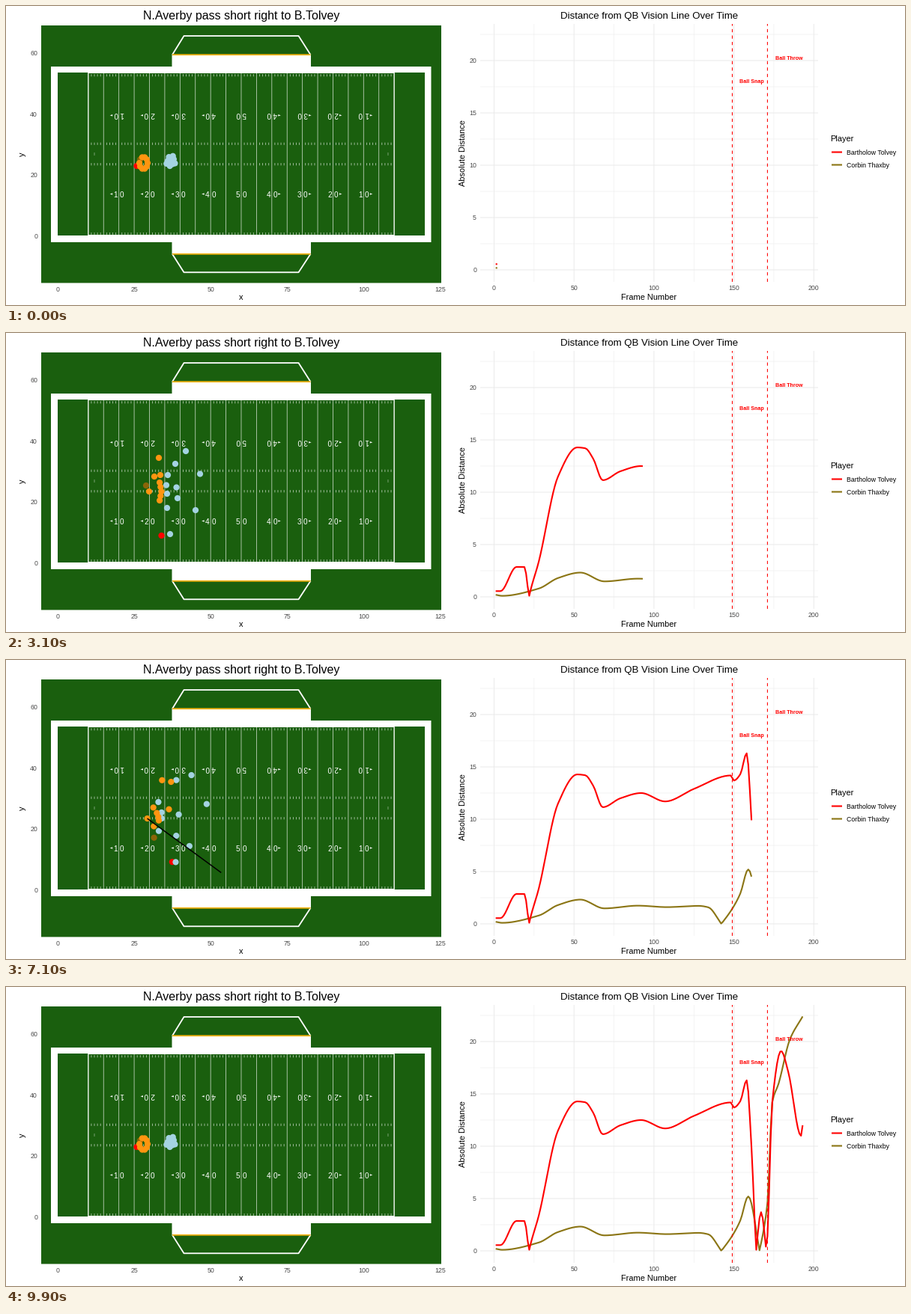
A matplotlib script for the animation above (10000 ms loop, 1200x400 px).

```python
import numpy as np
import matplotlib.pyplot as plt
from matplotlib.animation import FuncAnimation
from matplotlib.patches import Polygon, Rectangle

W, H, DPI = 1200, 400, 100
PX = 72 / DPI
GRASS, ORANGE, BLUE = "#1a5f0e", "#ff9510", "#a4d3e2"
RED, OLIVE, BROWN = "#ff0000", "#8b7514", "#8b6508"
GRID, TICK = "#ebebeb", "#4d4d4d"
SNAP, THROW, LAST = 149, 171, 193

plt.rcParams["font.family"] = "Liberation Sans"
fig = plt.figure(figsize=(W / DPI, H / DPI), dpi=DPI, facecolor="white")
ax = fig.add_axes([0, 0, 1, 1])
ax.set(xlim=(0, W), ylim=(H, 0))
ax.axis("off")


# ---- drawing helpers, all in pixels ----

def label(x, y, s, size, color="black", ha="center", rot=0, weight="normal"):
    """Text whose capitals are centred on y, for rot 0, 90 or 180."""
    off = 0.36 * size
    dx, dy = {0: (0, off), 90: (off, 0), 180: (0, -off)}[rot]
    ax.text(x + dx, y + dy, s, fontsize=size * PX, color=color, ha=ha,
            va="baseline", rotation=rot, rotation_mode="anchor", weight=weight)


def box(x0, y0, x1, y1, color):
    ax.add_patch(Rectangle((x0, y0), x1 - x0, y1 - y0, fc=color, ec="none", snap=False))


def line(xs, ys, color, width, **kw):
    return ax.plot(xs, ys, color=color, lw=width * PX, solid_capstyle="butt",
                   snap=False, **kw)[0]


def uprights(xs, y0, y1, width, alpha=1):
    ax.vlines(xs, y0, y1, color="white", lw=width * PX, alpha=alpha, snap=False)


def fx(x):
    return 69 + 4.083 * np.asarray(x)


def gx(n):
    return 651.5 + 2.134 * np.asarray(n)


def gy(v):
    return 353 - 14 * np.asarray(v)


# ---- still parts ----

def draw_field():
    box(47, 26, 581, 370.5, GRASS)
    box(60, 81, 567.5, 316, "white")
    box(69, 89, 559, 307, GRASS)

    for edge, bench, back in ((81, 65.2, 40), (316, 331.8, 356.3)):
        box(221.5, min(edge, bench), 407, max(edge, bench), "white")
        line([222, 237.5, 390.5, 406.5], [bench, back, back, bench], "white", 1.8)
        line([222, 406.5], [bench, bench], "#f2b212", 1.8)

    yards = np.arange(10, 111)
    on_five = yards % 5 == 0
    uprights(fx(yards[on_five]), 89.5, 306.5, 0.8, 0.75)
    uprights(fx([10, 110]), 89, 307, 1.1)
    for y in (89.5, 306.5):
        line(fx([10, 110]), [y, y], "white", 1)
    for y in (92.7, 184.3, 211.7, 304.6):
        uprights(fx(yards[~on_five]), y - 1.6, y + 1.6, 0.8, 0.7)
    uprights(fx([12, 108]), 196, 200, 0.8, 0.5)

    for k in range(1, 10):
        x, way = fx(10 + 10 * k), np.sign(k - 5)
        for y, rot, side in ((252.5, 0, -1), (145.3, 180, 1)):
            label(x + 4.2 * side, y, str(min(k, 10 - k)), 10, "white", rot=rot)
            label(x - 4.2 * side, y, "0", 10, "white", rot=rot)
            tip, base, mid = x + 12 * way, x + 8.5 * way, y + side
            if way:
                ax.add_patch(Polygon([(tip, mid), (base, mid - 1.2), (base, mid + 1.2)],
                                     fc="white", ec="none"))

    for v in range(0, 126, 25):
        label(fx(v), 379, str(v), 8.8, TICK)
    for v in range(0, 61, 20):
        label(42, 307.5 - 4.075 * v, str(v), 8.8, TICK, ha="right")
    label(314, 389.5, "x", 11)
    label(21.5, 198.5, "y", 11, rot=90)
    label(313.8, 12, "N.Averby pass short right to B.Tolvey", 16)


def draw_chart():
    for i in range(9):
        line([gx(25 * i)] * 2, [24, 369], GRID, 0.5 if i % 2 else 1.07)
        line([633, 1084], [gy(2.5 * i)] * 2, GRID, 0.5 if i % 2 else 1.07)
    line([633, 1084], [gy(22.5)] * 2, GRID, 0.5)
    for i in range(5):
        label(gx(50 * i), 377, str(50 * i), 8.8, TICK)
        label(628, gy(5 * i) + 0.3, str(5 * i), 8.8, TICK, ha="right")
    label(858.5, 389.5, "Frame Number", 11)
    label(609.5, 197, "Absolute Distance", 11, rot=90)
    label(858.5, 12, "Distance from QB Vision Line Over Time", 13.2)

    label(1100, 177.5, "Player", 11, ha="left")
    for y, color, name in ((195.5, RED, "Bartholow Tolvey"), (212.5, OLIVE, "Corbin Thaxby")):
        line([1102, 1116], [y, y], color, 2.1)
        label(1122.5, y + 0.5, name, 8.8, ha="left")


# ---- motion ----

def smooth(points, n):
    """Monotone cubic curve through a few (time, value) points."""
    t, v = np.array(points, float).T
    d = np.diff(v) / np.diff(t)
    a, b = d[:-1], d[1:]
    same = a * b > 0
    inner = np.where(same, 2 * a * b / np.where(same, a + b, 1), 0)
    m = np.concatenate([d[:1], inner, d[-1:]])
    i = np.clip(np.searchsorted(t, n, side="right") - 1, 0, len(t) - 2)
    h = t[i + 1] - t[i]
    u = np.clip((n - t[i]) / h, 0, 1)
    return ((1 - u) ** 2 * ((1 + 2 * u) * v[i] + u * h * m[i])
            + u ** 2 * ((3 - 2 * u) * v[i + 1] - (1 - u) * h * m[i + 1]))


def ease(n, start, end, power=None):
    u = np.clip((n - start) / (end - start), 0, 1)
    return u ** power if power else u * u * (3 - 2 * u)


# Signed distances; the chart shows their size, so a sign change is a sharp dip.
WIDE = [(1, -.55), (4, -.55), (14, -2.86), (19, -2.85), (22, .1), (28, 3.4), (40, 11.5),
        (52, 14.28), (57, 14.2), (62, 13.2), (68, 11.15), (79, 12), (92, 12.5), (107, 11.7),
        (125, 12.9), (148, 14.18), (150, 13.7), (154, 14.3), (158, 16.3), (161, 9.9), (164, .1),
        (167, -3.7), (170, -.4), (171, 1.4), (174, 14.2), (179.5, 19.1), (184, 17.1),
        (192, 11), (193, 12)]
BACK = [(1, .2), (5, .1), (28, .8), (40, 1.8), (54, 2.32), (69, 1.48), (90, 1.74), (108, 1.6),
        (128, 1.72), (134, 1.58), (142, .03), (149, -1.45), (154, -2.9), (159, -5.2),
        (166, -.05), (171, 4.6), (174, 14.2), (178, 16), (185, 20.2), (193, 22.4)]
AIM = [(149, 37.7), (157, 27), (161, -36.3), (165.5, -65), (171, -42.8)]

# Each player: spot at the snap, spot at the throw.
LINE_SET = [(207.5 - 1.2 * abs(k), 212 + 6 * k) for k in range(2, -3, -1)]
LINE_END = [(187.5, 220.5), (201, 210.5), (198, 207), (195, 203), (186, 194)]
OFFENSE = [((207.5, 271), (240, 269)), ((189, 220.5), (208.5, 259.5)),
           *zip(LINE_SET, LINE_END),
           ((191, 212), (185.5, 212)), ((204, 167), (241, 158)),
           ((203, 178), (215, 139)), ((206, 190), (232, 212))]
DEFENSE = [((240, 158), (257, 149)), ((226, 175), (229, 142.5)), ((216, 190), (187.5, 190)),
           ((259, 188.5), (279, 198)), ((214, 203.5), (199.5, 204.5)),
           ((227.5, 206.5), (234.5, 207)), ((215, 215), (199, 208)), ((229, 221), (225, 253)),
           ((215, 234), (190, 222)), ((253, 237), (234.5, 264)), ((219, 269), (236, 272))]
RUNNER, QB, SLOT = 1, 7, 9
CATCH = np.array([275, 270])

spots = np.array(OFFENSE + DEFENSE, float)
at_snap, at_throw = spots[:, 0], spots[:, 1]
lined_up = at_snap.copy()
lined_up[[RUNNER, SLOT]] = (187, 204), (198, 192)  # both shift before the snap

# The offense huddles in a ring, the defense in a loose bunch.
k = np.arange(11)
ring, spiral = k * 2 * np.pi / 10, k * 2.4
bunch = np.sqrt(k / 10)
huddle = np.concatenate([
    np.c_[183.5 - 5.5 * np.cos(ring), 210 - 8 * np.sin(ring)],
    np.c_[220 + 6.5 * bunch * np.cos(spiral), 208 + 8 * bunch * np.sin(spiral)]])
huddle[0] = 174.5, 214

UNDER = 3  # offensive players drawn beneath the defense
order = np.r_[0:UNDER, 11:22, UNDER:11]
colors = np.array([RED, BROWN] + [ORANGE] * 9 + [BLUE] * 11)


def positions(n):
    walk = np.where(np.arange(22) < 11, ease(n, 1, 42), np.interp(n, [1, 40, 90], [0, .35, 1]))
    return (huddle + (lined_up - huddle) * walk[:, None]
            + (at_snap - lined_up) * ease(n, 130, SNAP)
            + (at_throw - at_snap) * ease(n, SNAP, THROW, 1.35)
            + (CATCH - at_throw) * 0.35 * ease(n, THROW, LAST, 1))


def play_frame(step):
    """Play moment for a step, with pauses at the snap and the throw."""
    return int(round(np.interp(step, [0, 31, 51, 66, 75, 91, 99],
                               [1, 93, SNAP, SNAP, THROW, THROW, LAST])))


draw_field()
draw_chart()
moments = np.arange(1, LAST + 1)
curves = [(line([], [], color, 2.1, solid_joinstyle="round"), gy(abs(smooth(points, moments))))
          for color, points in ((OLIVE, BACK), (RED, WIDE))]
for n in (SNAP, THROW):
    line([gx(n)] * 2, [369, 24], RED, 1.07, dashes=(4, 4))
label(995.2, 100, "Ball Snap", 7.2, RED, weight="bold")
label(1045.4, 69, "Ball Throw", 7.2, RED, weight="bold")
dots = ax.scatter(*huddle[order].T, s=35, c=colors[order], linewidths=0, zorder=4)
vision = line([], [], "black", 1.5, zorder=5)


def update(step):
    n = play_frame(step)
    shown = max(n, 2)
    for path, ys in curves:
        path.set_data(gx(moments[:shown]), ys[:shown])

    now = positions(1 if step == 99 else n)  # the field resets one step early
    dots.set_offsets(now[order])
    x, y = now[QB]
    a = np.radians(smooth(AIM, n))
    vision.set_data([x, x + 122.4 * np.cos(a)], [y, y - 122.4 * np.sin(a)])
    vision.set_visible(SNAP <= n <= THROW)
    return [path for path, _ in curves] + [dots, vision]


anim = FuncAnimation(fig, update, frames=100, interval=100,
                     init_func=lambda: update(0), repeat=True, repeat_delay=0)
plt.show()
```
